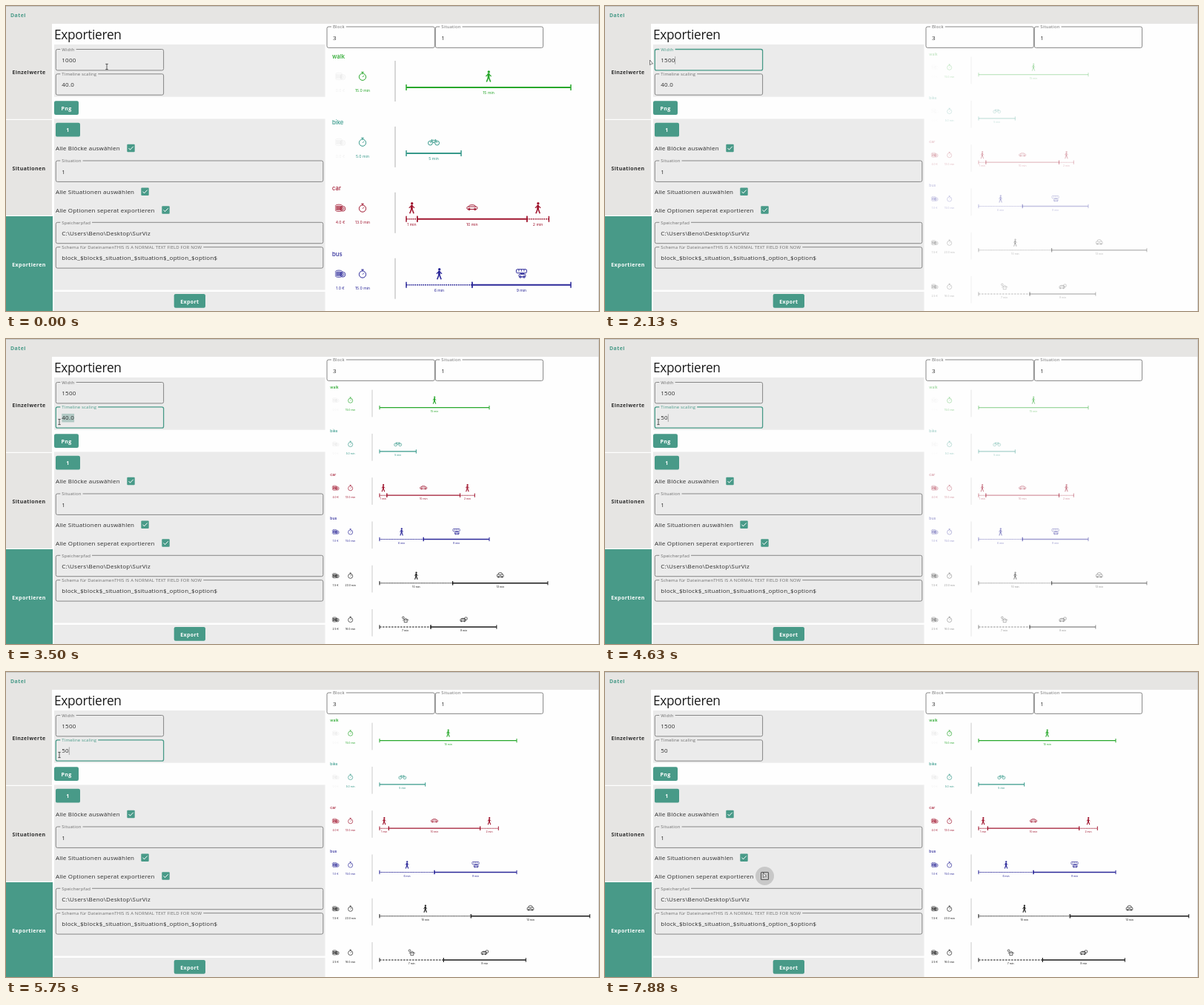
Animation of 800x412 px, one loop 8000 ms. Source, as an HTML page with a canvas:

```html
<!DOCTYPE html>
<html lang="de">
<head>
<meta charset="utf-8">
<title>Exportieren</title>
<style>
html, body { margin: 0; width: 100%; height: 100%; overflow: hidden; background: #fefefe; }
canvas { display: block; width: 800px; height: 412px; }
</style>
</head>
<body>
<canvas id="stage"></canvas>
<script>
const W = 800, H = 412, LOOP = 8000, STEP = 125;
const canvas = document.getElementById('stage');
const ratio = window.devicePixelRatio || 1;
canvas.width = W * ratio;
canvas.height = H * ratio;
const c = canvas.getContext('2d');

const TEAL = '#489a88', PANEL = '#ebebeb', BAR = '#e6e5e3', INK = '#2c2c2c', PAGE = '#fefefe';
const UI = '"Open Sans", "Noto Sans", sans-serif';
const FACE = 'Inter, sans-serif';
const LEFT = 67.3, SHORT = 145.3, LONG = 360.5, FIELD_H = 28.4;

const clamp = (v, a = 0, b = 1) => Math.max(a, Math.min(b, v));
const mix = (a, b, k) => a + (b - a) * k;

function box(x, y, w, h, fill) {
  c.fillStyle = fill;
  c.fillRect(x, y, w, h);
}

function stroke(width, color) {
  c.lineWidth = width;
  c.strokeStyle = color;
  c.stroke();
}

function line(x1, y1, x2, y2, width, color) {
  c.beginPath();
  c.moveTo(x1, y1);
  c.lineTo(x2, y2);
  stroke(width, color);
}

function outline(x, y, w, h, r, width, color) {
  c.beginPath();
  c.roundRect(x, y, w, h, r);
  stroke(width, color);
}

function solid(x, y, w, h, r, color) {
  c.beginPath();
  c.roundRect(x, y, w, h, r);
  c.fillStyle = color;
  c.fill();
}

function ring(x, y, r, width, color) {
  c.beginPath();
  c.arc(x, y, r, 0, 7);
  stroke(width, color);
}

function disc(x, y, r, color) {
  c.beginPath();
  c.arc(x, y, r, 0, 7);
  c.fillStyle = color;
  c.fill();
}

function setFont(size, weight, family, spacing = 0) {
  c.font = `${weight} ${size}px ${family}`;
  c.letterSpacing = spacing + 'px';
}

function write(text, x, y, color = INK, align = 'left') {
  c.textAlign = align;
  c.fillStyle = color;
  c.fillText(text, x, y);
}

const bodyFont = () => setFont(8, 400, UI, 0.22);

function bold(text, x, y, color, align = 'center') {
  setFont(7, 700, UI, 0.4);
  write(text, x, y, color, align);
}

function button(x, y, w, text) {
  solid(x, y, w, 18.8, 2.2, TEAL);
  bold(text, x + w / 2, y + 12.6, '#fff');
}

// Outlined text field; edit = {caret, from}
function field(x, y, w, label, text, bg, edit) {
  outline(x, y, w, FIELD_H, 2.2, edit ? 1.3 : 1, edit ? TEAL : '#868686');
  setFont(6, 400, UI, 0.15);
  box(x + 6, y - 2, c.measureText(label).width + 4, 4, bg);
  write(label, x + 8, y + 2.2, edit ? TEAL : '#6c6c6c');
  bodyFont();
  const left = x + 8, base = y + 17.6;
  const width = c.measureText(text).width;
  if (edit && edit.from < text.length) {
    const start = c.measureText(text.slice(0, edit.from)).width;
    box(left + start, base - 8.5, width - start, 11.5, 'rgba(74,140,125,0.36)');
  } else if (edit && edit.caret) {
    box(left + width, base - 8, 0.6, 10.5, '#777');
  }
  write(text, left, base);
}

function checkbox(x, y, on) {
  if (!on) return outline(x - 5, y - 5, 10, 10, 1, 1.1, '#555');
  solid(x - 5.2, y - 5.2, 10.4, 10.4, 1, TEAL);
  line(x - 3, y, x - 0.8, y + 2.3, 1, '#fff');
  line(x - 1.2, y + 2.3, x + 3.2, y - 2.2, 1, '#fff');
}

// Body with a domed roof on two wheels
function vehicle(w, h, roof, color) {
  outline(-w / 2, -h / 2, w, h, 1.4, 1, color);
  c.beginPath();
  c.ellipse(0, -h / 2, w * 0.33, roof, 0, Math.PI, 0);
  stroke(1, color);
  for (const side of [-1, 1]) ring(side * w * 0.28, h / 2, 1.3, 1, color);
}

// Icons are drawn around the origin
const icons = {
  walk(k) {
    disc(0.3, -6, 1.7, k);
    line(0, -4, 0, 1.5, 2.8, k);
    for (const side of [-1, 1]) {
      line(0, 0.5, side * 2.7, 7.5, 1.6, k);
      line(0, -3.4, side * 3.6, 0, 1.2, k);
    }
  },
  bike(k) {
    for (const side of [-1, 1]) {
      ring(side * 4.6, 1.2, 2.9, 1, k);
      line(side * 4.6, 1.2, side * 2.4, -4, 0.9, k);
      line(0, 1.2, side * 2.6, -2.6, 0.9, k);
    }
    line(-2.6, -2.6, 2.6, -2.6, 0.9, k);
  },
  car: k => vehicle(14, 3.4, 2.4, k),
  taxi(k) {
    vehicle(13, 5, 4, k);
    line(-2, 0, 2, 0, 1, k);
  },
  bus(k) {
    outline(-7, -6, 14, 5, 1.4, 1, k);
    for (let x = -3.5; x < 7; x += 3.5) line(x, -6, x, -3, 0.8, k);
    c.translate(1, 2.4);
    vehicle(9, 3.6, 1, k);
  },
  home(k) {
    for (const side of [-1, 1]) line(1, -2.5, 1 + side * 6, 1.5, 1, k);
    outline(-2, 0.5, 6, 5, 0, 1, k);
    ring(-4, -4, 2, 1, k);
  },
  share(k) {
    outline(2, -4.5, 5, 5, 1, 1, k);
    c.translate(-1.5, 1);
    vehicle(11, 4, 1.6, k);
  },
  money(k) {
    for (let y = -3; y <= 3; y += 2) {
      c.beginPath();
      c.ellipse(-2, y, 4.6, 1.7, 0, 0, 7);
      stroke(0.8, k);
    }
    for (const r of [3.4, 1.5]) ring(3.4, 1, r, 0.9, k);
  },
  clock(k) {
    ring(0, 0.8, 4.6, 1, k);
    line(-1.6, -5.6, 1.6, -5.6, 1.1, k);
    line(0, -5.6, 0, -3.8, 1, k);
    line(0, 1, 2, -1.2, 0.9, k);
  }
};

function icon(name, x, y, color) {
  c.save();
  c.translate(x, y);
  icons[name](color);
  c.restore();
}

const DOT = [1.8, 1], DASH = [4, 2];
const routes = [
  ['walk', '#27a72b', '', [[15, 'walk']]],
  ['bike', '#36998a', '', [[5, 'bike']]],
  ['car', '#a0162f', '4.0 €', [[1, 'walk', DOT], [10, 'car'], [2, 'walk', DOT]]],
  ['bus', '#2a2798', '1.0 €', [[6, 'walk', DOT], [9, 'bus']]],
  ['', '#181818', '1.5 €', [[10, 'walk', DOT], [13, 'taxi']]],
  ['', '#181818', '2.5 €', [[7, 'home', DASH], [9, 'share']]]
];

function drawRoute([name, color, price, legs], unit) {
  const iconY = 37, noteY = 58, axis = 52;
  const total = legs.reduce((sum, leg) => sum + leg[0], 0);
  setFont(7.7, 500, FACE);
  write(name, 8, 13, color);
  setFont(5.2, 400, FACE);
  const alpha = c.globalAlpha;
  if (!price) c.globalAlpha = alpha * 0.08;
  icon('money', 19, iconY, price ? color : '#555');
  write(price || '0.0 €', 19, noteY, price ? color : '#555', 'center');
  c.globalAlpha = alpha;
  icon('clock', 49, iconY, color);
  write(total + '.0 min', 49, noteY, color, 'center');
  line(93, 16, 93, 71, 0.9, '#aaa');
  let x = 108;
  for (const [min, kind, dash] of legs) {
    const end = x + min * unit, mid = (x + end) / 2;
    c.setLineDash(dash || []);
    line(x, axis, end, axis, dash ? 1.6 : 2, color);
    c.setLineDash([]);
    for (const tick of [x, end]) line(tick, axis - 4, tick, axis + 4, 1.5, color);
    icon(kind, mid, iconY, color);
    write(min + ' min', mid, axis + 9.3, color, 'center');
    x = end;
  }
}

function preview(width, scaling, alpha) {
  if (alpha < 0.02) return;
  c.save();
  c.globalAlpha = alpha;
  c.translate(432, 58);
  c.scale(1000 / width, 1000 / width);
  for (const route of routes) {
    drawRoute(route, 0.37 * scaling);
    c.translate(0, 88.9);
  }
  c.restore();
}

const fadeIn = (t, start) => clamp((t - start) / 450);

function drawPreview(t) {
  if (t < 1500) return preview(1000, 40, 1);
  const fadeOut = t < 4625 ? 1 : 0.45 ** ((t - 4500) / STEP);
  preview(1500, 40, fadeIn(t, 2000) * fadeOut);
  preview(1500, 50, fadeIn(t, 4750));
}

// Each move: start, end, x, y
const moves = [[375, 875, 61, 77], [2625, 3125, 112, 107], [3125, 3500, 72, 112], [5875, 7000, 214, 275]];

function pointer(t) {
  let x = 136, y = 82;
  for (const [from, to, toX, toY] of moves) {
    const k = clamp((t - from) / (to - from));
    x = mix(x, toX, k);
    y = mix(y, toY, k);
  }
  return [x, y];
}

function drawPointer(x, y) {
  const inField = x > LEFT && x < LEFT + SHORT && [58, 92].some(top => y > top && y < top + FIELD_H);
  if (inField) {
    for (const end of [-3.6, 3.6]) line(x - 1.7, y + end, x + 1.7, y + end, 0.8, '#333');
    line(x, y - 3.6, x, y + 3.6, 0.8, '#333');
    return;
  }
  c.beginPath();
  c.moveTo(x - 0.5, y - 4);
  c.lineTo(x - 0.5, y + 2.6);
  c.lineTo(x + 1.2, y + 1.4);
  c.lineTo(x + 3.6, y + 1);
  c.closePath();
  c.fillStyle = '#fff';
  c.fill();
  stroke(0.7, '#444');
}

// First key at start, the rest one per step after a short pause
function typed(t, before, text, start) {
  if (t < start) return before;
  return text.slice(0, 1 + Math.max(0, Math.floor((t - start) / STEP) - 2));
}

function selectFrom(text, x) {
  bodyFont();
  return Math.round(clamp((x - LEFT - 8) / c.measureText(text).width) * text.length);
}

function drawForm(t, px) {
  const inputs = [
    { label: 'Width', before: '1000', after: '1500', y: 58.5, focus: 375, key: 1500, blur: 3000 },
    { label: 'Timeline scaling', before: '40.0', after: '50', y: 91.8, focus: 3000, key: 4250, blur: 7375 }
  ];
  for (const { label, before, after, y, focus, key, blur } of inputs) {
    const text = typed(t, before, after, key);
    const caret = Math.floor((t - key - 450) / 500) % 2 === 0 || t < key + 950;
    const edit = t >= focus && t < blur && { caret, from: t < key ? selectFrom(text, px) : text.length };
    field(LEFT, y, SHORT, label, text, PANEL, edit);
  }
}

function drawFrame() {
  box(0, 0, W, H, PAGE);
  box(0, 0, W, 24, BAR);
  ['Einzelwerte', 'Situationen', 'Exportieren'].forEach((name, i) => {
    const y = 24 + 130 * i, active = i === 2;
    box(0, y, active ? 63 : 62, 128.8, active ? TEAL : BAR);
    bold(name, 31, y + 67.7, active ? '#fff' : INK);
  });
  for (const [top, bottom] of [[52, 122.7], [152.5, 383.5], [386, H]]) {
    box(65, top, 365.5, bottom - top, PANEL);
  }
  box(0, 0, W, 0.8, '#bdbdbd');
  box(W - 0.8, 0, 0.8, H, '#c8c8c8');
  bold('Datei', 6, 14.7, TEAL, 'left');
  setFont(17.3, 400, UI, -0.3);
  write('Exportieren', 65, 45, '#1c1c1c');
}

function drawOptions(t) {
  button(65, 128.2, 33, 'Png');
  button(67, 157.8, 33, '1');
  button(226.7, 389, 42.3, 'Export');
  const wide = [
    ['Situation', '1', 209],
    ['Speicherpfad', 'C:\\Users\\Beno\\Desktop\\SurViz', 292.3],
    ['Schema für DateinamenTHIS IS A NORMAL TEXT FIELD FOR NOW',
      'block_$block$_situation_$situation$_option_$option$', 325.7]
  ];
  for (const [label, text, y] of wide) field(LEFT, y, LONG, label, text, PANEL);
  field(433, 28, SHORT, 'Block', '3', PAGE);
  field(579.3, 28, SHORT, 'Situation', '1', PAGE);
  if (t >= 7375) disc(215.5, 275.5, 12.5 * clamp((t - 7250) / 375), 'rgba(0,0,0,0.15)');
  const checks = [
    ['Alle Blöcke auswählen', 168.5, 192, true],
    ['Alle Situationen auswählen', 187.5, 250.7, true],
    ['Alle Optionen seperat exportieren', 215.5, 275.5, t < 7500]
  ];
  for (const [label, x, y, on] of checks) {
    bodyFont();
    write(label, 67, y + 3.2);
    checkbox(x, y, on);
  }
}

function draw(now) {
  const t = Math.floor((now % LOOP) / STEP) * STEP;
  const [px, py] = pointer(t);
  c.setTransform(ratio, 0, 0, ratio, 0, 0);
  drawFrame();
  drawOptions(t);
  drawForm(t, px);
  drawPreview(t);
  drawPointer(px, py);
}

const start = performance.now();
function tick() {
  draw(performance.now() - start);
  requestAnimationFrame(tick);
}
tick();
</script>
</body>
</html>
```
